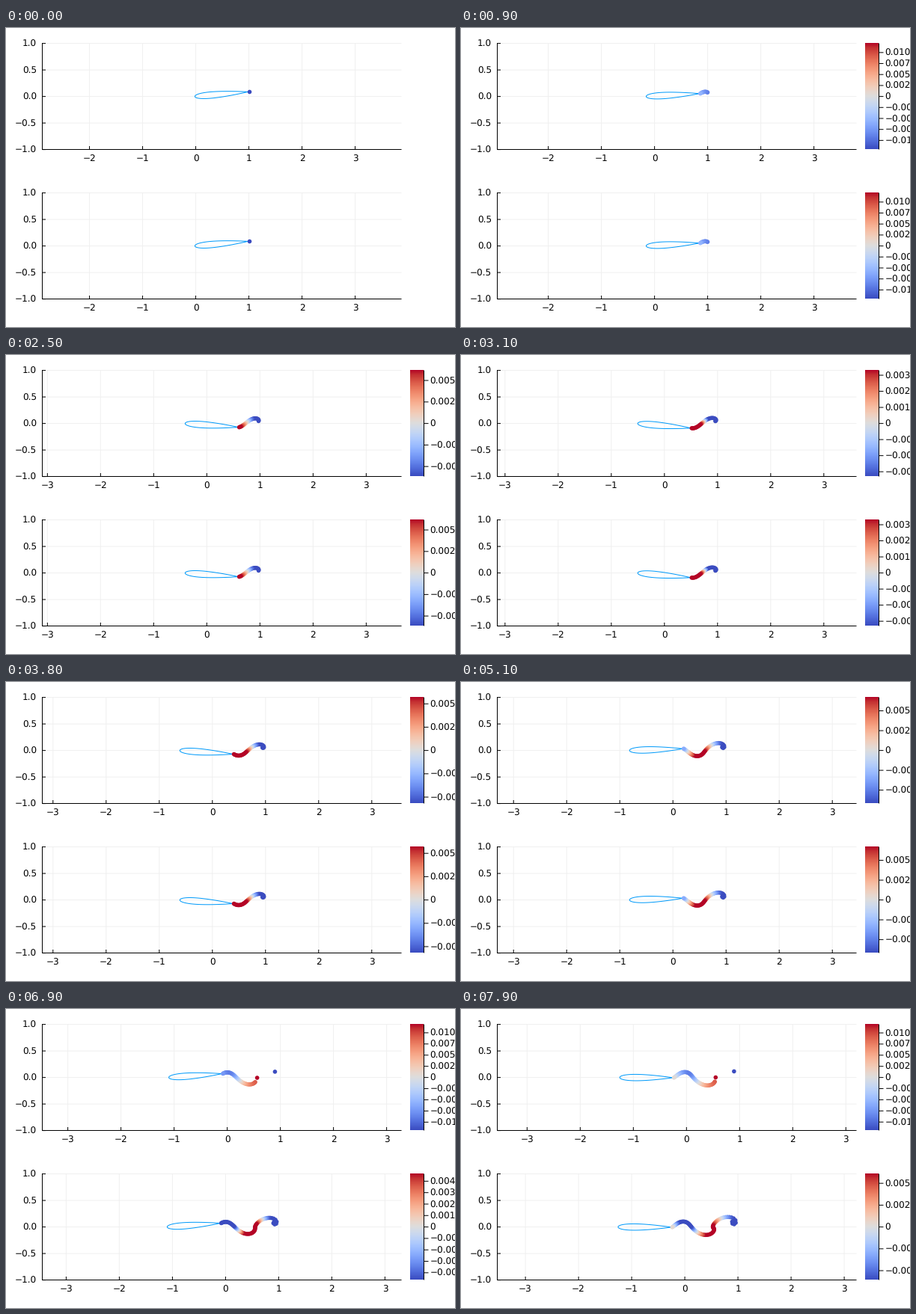
These frames come from a looping animation (600x400 px, 8000 ms). A matplotlib script:

```python
import numpy as np
import matplotlib.pyplot as plt
from matplotlib.animation import FuncAnimation
from matplotlib.collections import LineCollection

FRAMES = 80
STEP = 0.0157            # forward travel per frame, at unit speed
PITCH = np.radians(5)
OMEGA = 0.1              # pitching phase per frame
STRENGTH = 0.0092        # peak circulation of a shed vortex
CORE = 0.02              # smoothing radius of a vortex
MERGE_AT, MERGED = 64, 32

SCALE = 71               # pixels per unit
LEFT, RIGHT, TOP, BOTTOM, MID = 48.5, 528.5, 20.5, 162.5, 91.6
PX = 0.72                # points per pixel
FONT = dict(family="DejaVu Sans", fontsize=12 * PX, color="black")
plt.rcParams["text.hinting"] = "none"


def on_chord(n, s):
    """Point at distance s behind the nose along the pitching chord."""
    a = PITCH * np.cos(OMEGA * n)
    return np.array([-STEP * (n + 1) + s * np.cos(a), s * np.sin(a)])


def foil(n):
    s = (1 - np.cos(np.linspace(0, np.pi, 60))) / 2
    t = 0.6 * (0.2969 * np.sqrt(s) - 0.126 * s - 0.3516 * s ** 2
               + 0.2843 * s ** 3 - 0.1036 * s ** 4)
    s, t = np.r_[s[::-1], s], np.r_[t[::-1], -t]
    a = PITCH * np.cos(OMEGA * n)
    x, y = on_chord(n, s)
    return x - t * np.sin(a), y + t * np.cos(a)


def velocity(at, pos, gam):
    """Flow induced at some points by smoothed vortices."""
    dx, dy = (at[:, None] - pos[None]).transpose(2, 0, 1)
    k = gam / (2 * np.pi * (dx ** 2 + dy ** 2 + CORE ** 2))
    return np.stack([-(k * dy).sum(1), (k * dx).sum(1)], axis=1)


def merge(pos, gam):
    """Replace the oldest vortices by one vortex of each sign."""
    old = np.arange(len(gam)) < MERGED
    groups = [old & (gam < 0), old & (gam > 0)]
    lumps = [np.average(pos[g], axis=0, weights=gam[g]) for g in groups]
    sums = [gam[g].sum() for g in groups]
    return np.vstack([lumps, pos[~old]]), np.r_[sums, gam[~old]]


def simulate(lump):
    """Wake positions, strengths and colour limit for every frame."""
    pos, gam, out = np.empty((0, 2)), np.empty(0), []
    for n in range(FRAMES):
        bound = STRENGTH / OMEGA * np.sin(OMEGA * n)
        if n:
            sources = np.vstack([pos, on_chord(n, 0.25)])
            pos = pos + STEP * velocity(pos, sources, np.r_[gam, bound])
        pos = np.vstack([pos, on_chord(n, 1.02)])
        gam = np.r_[gam, -STRENGTH * np.cos(OMEGA * n)]
        if lump and n == MERGE_AT:
            pos, gam = merge(pos, gam)
        limit = np.sqrt((np.sum(gam ** 2) + bound ** 2) / len(gam)) / 2
        out.append((pos, gam, limit))
    return out


def number(v, digits):
    return f"{v:.{digits}f}".replace("-", "\u2212")


fig = plt.figure(figsize=(6, 4), dpi=100, facecolor="white")
ax = fig.add_axes([0, 0, 1, 1])
ax.axis("off")


class Panel:
    def __init__(self, dy, lump):
        self.dy, self.wake = dy, simulate(lump)
        self.temp = []
        ys = [(v, MID - v * SCALE) for v in (-1, -0.5, 0, 0.5, 1)]
        self.lines([[(LEFT, y), (RIGHT, y)] for _, y in ys], "#f0f0f0", 0)
        self.lines([[(LEFT, TOP - 0.5), (LEFT, BOTTOM + 0.5)],
                    [(LEFT, BOTTOM), (RIGHT, BOTTOM)]]
                   + [[(LEFT, y), (LEFT + 4.5, y)] for _, y in ys], "black", 2)
        for v, y in ys:
            self.text(41.2, y + 4.4, number(v, 1), "right")
        self.bar = ax.imshow(np.linspace(1, 0, 256)[:, None], cmap="coolwarm",
                             extent=(540, 558, dy + 162, dy + 20),
                             aspect="auto", interpolation="bilinear")

    def lines(self, segs, color, z):
        segs = [[(x, y + self.dy) for x, y in s] for s in segs]
        return ax.add_collection(LineCollection(
            segs, colors=color, linewidths=PX, zorder=z, snap=False))

    def text(self, x, y, s, ha):
        return ax.text(x, y + self.dy, s, ha=ha, va="baseline", **FONT)

    def draw(self, n):
        for a in self.temp:
            a.remove()
        pos, gam, limit = self.wake[n]
        center = (-STEP * (n + 1) + pos[:, 0].max()) / 2
        zero = (LEFT + RIGHT) / 2 - center * SCALE

        xs = [(v, zero + v * SCALE) for v in range(-4, 5)]
        xs = [(v, x) for v, x in xs if LEFT <= x <= RIGHT]
        self.temp = [
            self.lines([[(x, TOP), (x, BOTTOM)] for _, x in xs], "#f0f0f0", 0),
            self.lines([[(x, BOTTOM), (x, BOTTOM - 4.5)] for _, x in xs],
                       "black", 2)]
        self.temp += [self.text(x, 178.5, number(v, 0), "center")
                      for v, x in xs]

        fx, fy = foil(n)
        self.temp += ax.plot(zero + fx * SCALE, MID + self.dy - fy * SCALE,
                             color="#009afa", lw=PX, zorder=3)
        shade = np.clip(0.5 + gam / (2 * limit), 0, 1) if n else np.zeros(1)
        self.temp.append(ax.scatter(
            zero + pos[:, 0] * SCALE, MID + self.dy - pos[:, 1] * SCALE,
            c=plt.cm.coolwarm(shade), s=(5.6 * PX) ** 2, linewidths=0,
            zorder=4, snap=False))

        self.bar.set_visible(n > 0)
        if n > 0:
            self.color_scale(limit)

    def color_scale(self, limit):
        step = 0.001 if limit < 0.005 else 0.0025 if limit < 0.0125 else 0.005
        digits = 4 if step == 0.0025 else 3
        k = int(limit / step)
        marks = [(i * step, MID - i * step / limit * SCALE)
                 for i in range(-k, k + 1)]
        self.temp.append(self.lines(
            [[(558.5, TOP), (558.5, BOTTOM)]]
            + [[(558.5, y), (564.5, y)] for _, y in marks], "black", 2))
        self.temp += [self.text(566.5, y + 4.4, number(v, digits) if v else "0",
                                "left") for v, y in marks]


panels = [Panel(0, True), Panel(200, False)]
ax.set_xlim(0, 600)
ax.set_ylim(400, 0)
ax.set_autoscale_on(False)


def update(n):
    for p in panels:
        p.draw(n)
    return []


anim = FuncAnimation(fig, update, frames=FRAMES, interval=100,
                     repeat=True, repeat_delay=0, blit=False)
plt.show()
```
